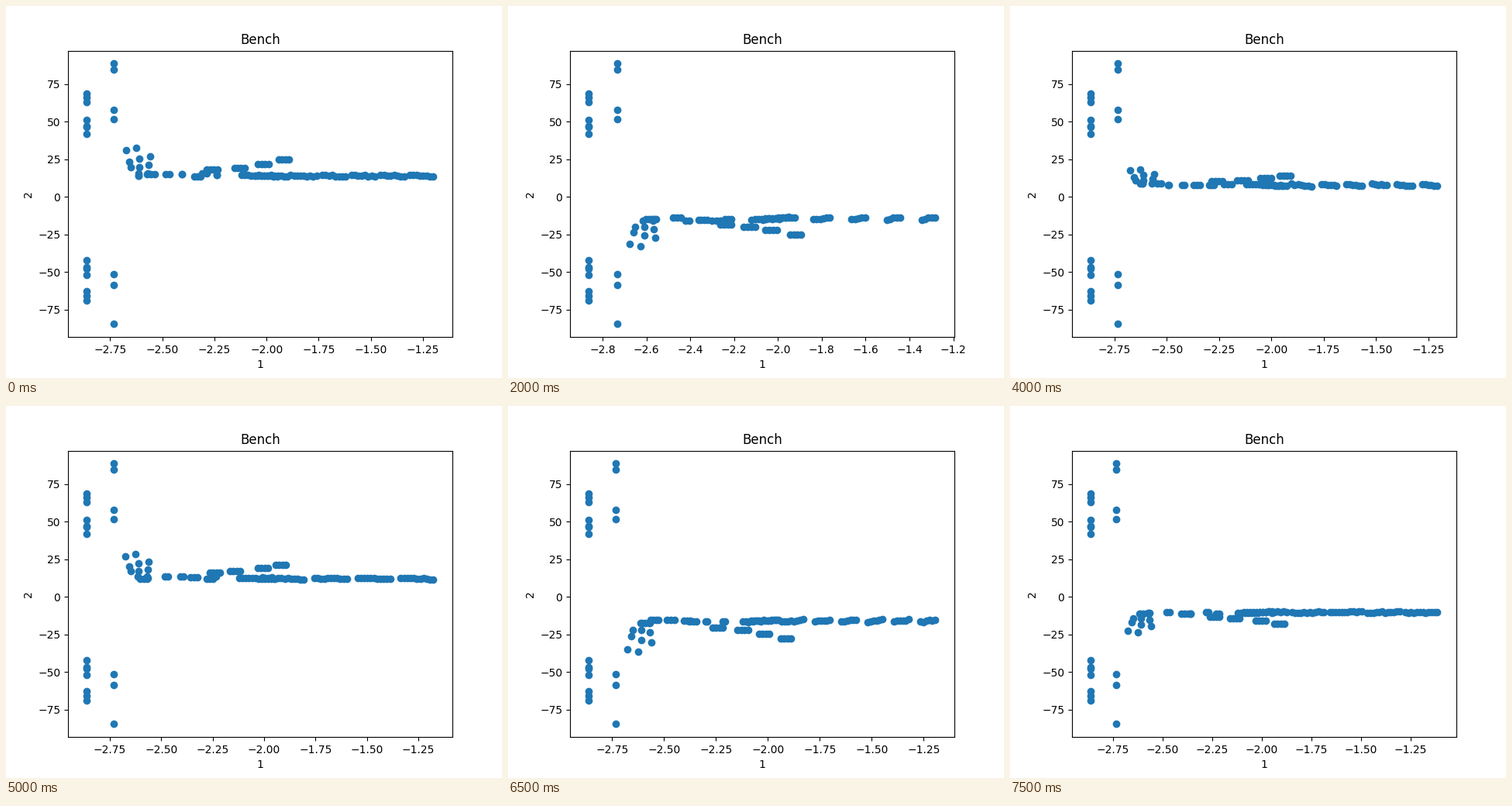
A matplotlib script for the animation above (8000 ms loop, 640 by 480 pixels).

```python
import numpy as np
import matplotlib.pyplot as plt
from matplotlib.animation import FuncAnimation

LEFT, PAD = -2.8687, 0.0084      # left data edge, gap from edge to outer dots

COLUMNS = {-2.8633: (69, 66, 63, 51, 47, 46.5, 42,
                     -42, -47, -48, -52, -63, -66, -69),
           -2.7325: (88.7, 84.7, 57.9, 51.6, -51.5, -58.6, -84.7)}
FIXED = np.array([(x, y) for x, ys in COLUMNS.items() for y in ys])

# right data edge, band level, spacing of the band's clusters, filled share
STEPS = [(-1.192, 14.1, 0.14, 0.8), (-1.258, -9, 0.12, 0.5),
         (-1.2116, -13.3, 0.108, 0.55), (-1.207, 10, 0.13, 0.6),
         (-1.2746, -14.3, 0.16, 0.38), (-1.36, 13, 0.12, 0.5),
         (-1.2116, -7, 0.114, 0.48), (-1.264, -12, 0.12, 0.5),
         (-1.2, 8, 0.12, 0.6), (-1.254, -14, 0.13, 0.5),
         (-1.1685, 12.3, 0.21, 0.75), (-1.187, -11, 0.12, 0.6),
         (-1.184, 4, 0.12, 0.5), (-1.186, -15.9, 0.127, 0.55),
         (-1.365, -7, 0.12, 0.5), (-1.107, -10.2, 0.19, 0.85)]

# x and rise above the band, as a share of the band level
HOOK = [(-2.675, 1.2), (-2.657, 0.65), (-2.65, 0.4),
        (-2.625, 1.3), (-2.61, 0.8), (-2.61, 0.4), (-2.615, 0.1),
        (-2.56, 0.9), (-2.567, 0.5), (-2.57, 0.1)]
HUMPS = [(-2.25, 0.3), (-2.135, 0.38), (-2.02, 0.55), (-1.92, 0.75)]


def row(x0, x1, y0, y1):
    """Evenly spaced dots from one point to another."""
    n = max(2, round((x1 - x0) / 0.015) + 1)
    return np.column_stack([np.linspace(x0, x1, n), np.linspace(y0, y1, n)])


def cloud_points(step):
    right, level, pitch, fill = STEPS[step]
    rng = np.random.default_rng(step)
    sign = np.sign(level)
    tilt = sign * (1.2 - fill)

    parts = [FIXED, [(x, level * (1 + k)) for x, k in HOOK]]

    # sparse start of the band
    for x in np.arange(-2.62, -2.2, 0.065):
        x += rng.uniform(-0.02, 0.02)
        y = level * rng.uniform(0.95, 1.12)
        parts.append(row(x, x + rng.uniform(0, 0.04), y, y))

    # clusters lifted off the band, higher towards the right
    for x, k in HUMPS:
        x += rng.uniform(-0.015, 0.015)
        y = level * (1 + k)
        parts.append(row(x - 0.025, x + 0.025, y, y))

    # the band itself, denser towards the middle
    for end in np.arange(right - PAD, -2.0, -pitch):
        share = fill + max(0, -1.73 - end) / 0.37
        run = row(end - pitch * min(share, 1.1), end, level + tilt, level - tilt)
        run[:, 1] += rng.uniform(-0.4, 0.4, len(run))
        parts.append(run)
    parts.append(row(-2.12, -1.95, level + tilt, level - tilt))
    return np.vstack(parts)


fig, ax = plt.subplots(figsize=(6.4, 4.8), dpi=100)
ax.set(title="Bench", xlabel="1", ylabel="2", ylim=(-93.4, 97.4))
cloud = ax.scatter([], [], color="C0")


def draw(step):
    right = STEPS[step][0]
    margin = 0.05 * (right - LEFT)
    ax.set_xlim(LEFT - margin, right + margin)
    cloud.set_offsets(cloud_points(step))
    return (cloud,)


anim = FuncAnimation(fig, draw, frames=len(STEPS), interval=500, repeat=True,
                     repeat_delay=0, blit=False)
plt.show()
```
